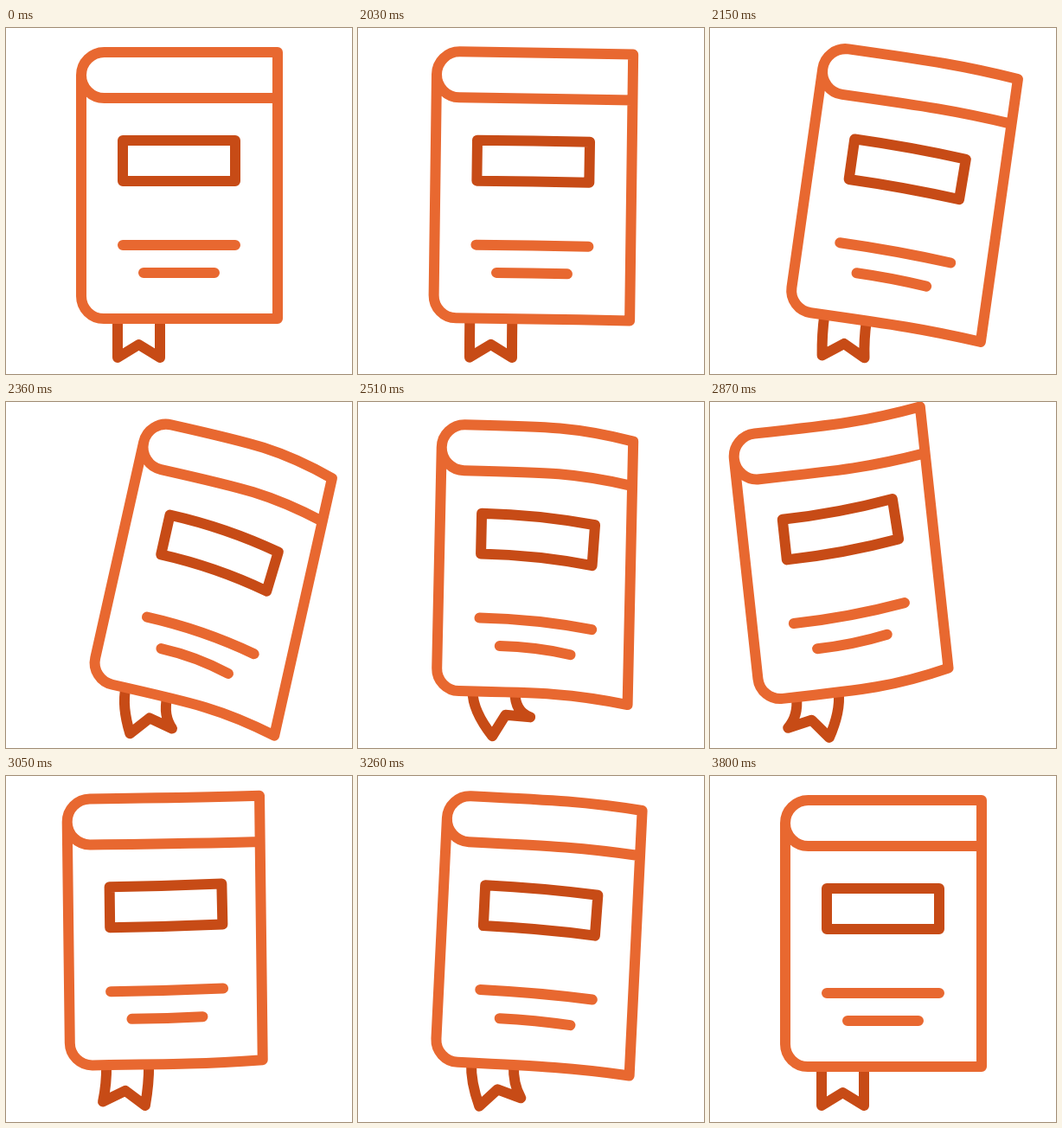
Recreate the animation shown at these times as an HTML page. Size 400 by 400 pixels, loop 3830 ms.

```html
<!DOCTYPE html>
<html lang="en">
<head>
<meta charset="utf-8">
<title>Book</title>
<style>
  html, body { margin: 0; width: 100%; height: 100%; overflow: hidden; background: #fff; }
  svg { display: block; width: 100vw; height: 100vh; }
  path { fill: none; stroke: #e86830; stroke-width: 12; stroke-linejoin: round; stroke-linecap: round; }
  .dark { stroke: #c74b16; }
  #ribbon { stroke-linecap: butt; }
</style>
</head>
<body>
<svg viewBox="0 0 400 400">
  <g id="book">
    <path id="ribbon" class="dark"/>
    <path id="cover"/>
    <path id="label" class="dark"/>
    <path id="lines"/>
  </g>
</svg>
<script>
const LOOP = 3830, STEP = 30, OFFSET = 20, START = 1985;

// Turning points: the body leads, its bend follows, the ribbon trails
const LEAD = [2290, 2695, 3260, 3640];
const FOLLOW = [2400, 2820, 3260, 3640];
const TRAIL = [2610, 2890, 3250, 3480, 3720];

const $ = id => document.getElementById(id);
const draw = (id, ...parts) => $(id).setAttribute("d", parts.join(""));

// Swings from rest through each peak and back to rest, with sine easing
function swing(t, times, ...peaks) {
  let from = START, value = 0;
  for (let i = 0; i < times.length; i++) {
    const next = peaks[i] || 0;
    if (t < times[i]) {
      const u = Math.max(0, (t - from) / (times[i] - from));
      return value + (next - value) * (1 - Math.cos(Math.PI * u)) / 2;
    }
    from = times[i];
    value = next;
  }
  return 0;
}

// A line drooping to its right end; a stiff one bends later
function droop(x0, x1, y, drop, stiff = 0) {
  const at = f => x0 + (x1 - x0) * f;
  return `L${x0} ${y}C${at(0.33 + 0.17 * stiff)} ${y} ${at(0.67)} ${y + drop / 3 * (1 - stiff)} ${x1} ${y + drop}`;
}

function render(t) {
  const tilt = swing(t, LEAD, 14.3, -8.7, 2.8);
  const dy = swing(t, LEAD, 9, -7, -1);
  const dx = swing(t, FOLLOW, 10, -30, 2);
  const bend = swing(t, FOLLOW, 18.5, -13, 6.5);
  const width = swing(t, FOLLOW, -5.5, -7, -2);
  const sway = swing(t, TRAIL, -29.5, 20, -14, 6) * Math.PI / 180;

  $("book").setAttribute("transform", `rotate(${tilt} 200 336) translate(${dx} ${dy})`);

  const edge = 314 + width;
  const top = bend - 0.3 * width, bottom = bend + 0.3 * width;
  draw("cover",
    "M87 54.5A26.5 26.5 0 0 1 113.5 28", droop(113.5, edge, 28, top, 1),
    `L${edge} ${336 + bottom}`,
    "M87 54.5A26.5 26.5 0 0 0 113.5 81", droop(113.5, edge, 81, 0.9 * top, 1),
    "M87 54.5V310A26 26 0 0 0 113 336", droop(113, edge, 336, bottom, 1));

  const drop = 0.8 * bend, lean = 0.09 * bend;
  draw("label",
    "M135 177V130", droop(135, 265 + lean, 130, drop),
    `L${265 - lean} ${177 + drop}`,
    "M135 177", droop(135, 265 - lean, 177, drop));
  draw("lines",
    "M135 251", droop(135, 265, 251, drop),
    "M159 283", droop(159, 241, 283, 0.62 * bend));

  const c = Math.cos(sway), s = Math.sin(sway);
  const hang = (x, y) => `${153.5 + x * c - y * s} ${336 + x * s + y * c}`;
  draw("ribbon", `M129 336Q129 358 ${hang(-24.5, 45)}L${hang(0, 30)}L${hang(24.5, 45)}Q178 358 178 336`);
}

const start = performance.now();
function tick() {
  const t = (performance.now() - start) % LOOP;
  render(Math.floor((t - OFFSET) / STEP) * STEP + OFFSET);
  requestAnimationFrame(tick);
}
tick();
</script>
</body>
</html>
```
